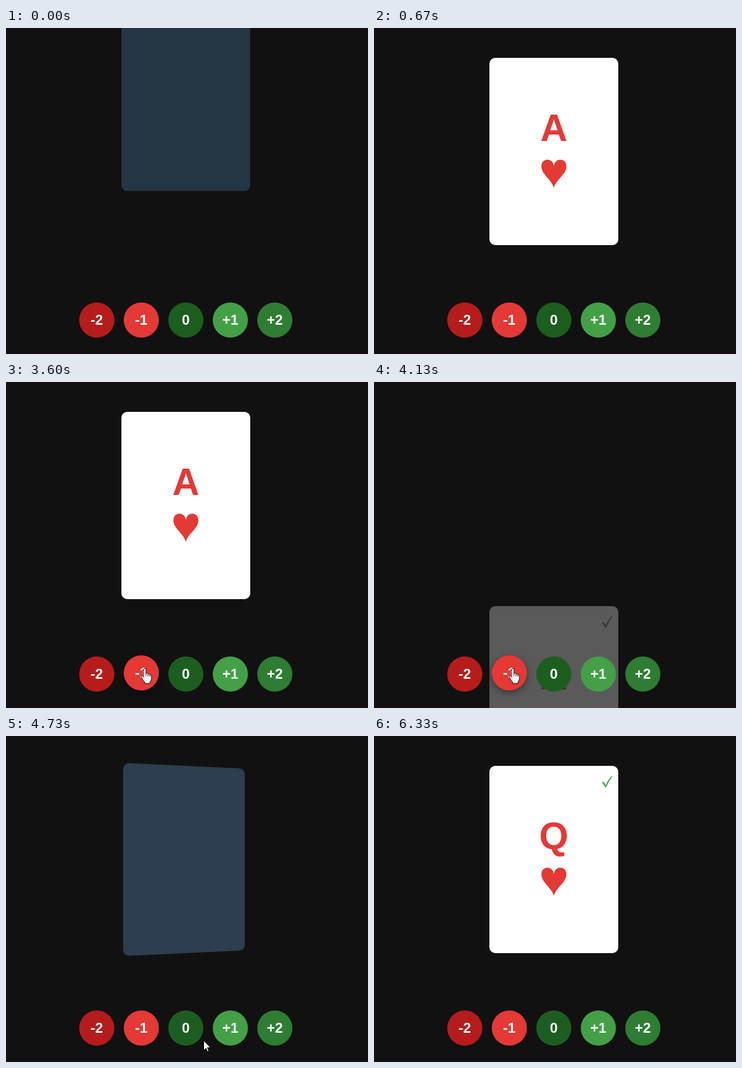
Recreate the animation shown at these times as an HTML page. Size 618 by 557 pixels, loop 8000 ms.

```html
<!DOCTYPE html>
<html lang="en">
<head>
<meta charset="utf-8">
<title>Card counting drill</title>
<style>
  html, body { margin: 0; width: 100%; height: 100%; overflow: hidden; background: #111; }
  body { position: relative; font-family: "Liberation Sans", Arial, sans-serif; font-weight: bold; }
  #slot { position: absolute; left: 197px; top: 51px; width: 220px; height: 320px; perspective: 1200px; }
  #card { width: 220px; height: 320px; border-radius: 10px; }
  #card svg { display: block; }
  .btn {
    position: absolute; top: 469px; width: 60px; height: 60px; border-radius: 50%;
    line-height: 60px; font-size: 24px; text-align: center; color: #fff;
  }
  #cursor { position: absolute; left: 0; top: 0; overflow: visible; }
</style>
</head>
<body>
<div id="slot"><div id="card">
  <svg id="face" width="220" height="320" fill="#e53935">
    <text id="rank" x="110" y="142" font-size="64" text-anchor="middle">A</text>
    <path d="M110 222C106 208 88.8 199 88.8 185.5C88.8 178 93.5 174 99 174C105 174 109 178 110 185C111 178 115 174 121 174C127 174 131.4 178 131.4 185.5C131.4 199 114 208 110 222Z"/>
    <path id="check" fill="#4caf50" d="M192 28.5L195 27Q197 30 198.3 33Q202.5 24 208 17.5L210 18Q203.5 26.5 199.5 36.5L197.5 36.8Q195.5 32 192 28.5Z"/>
  </svg>
</div></div>
<svg id="cursor" width="24" height="28" fill="#fff" stroke="#000" stroke-linejoin="round">
  <path id="arrow" d="M-.5 -.5V16L3.3 12.4L5.8 18.2L8.3 17.1L5.8 11.5H11Z"/>
  <g id="hand">
    <path d="M-2 0Q-2 -1.8 0 -1.8Q2 -1.8 2 0V6.5Q4.8 5.6 5.4 7.6Q8 7 8.6 8.9Q11.3 8.6 11.3 11.3V16Q11.3 18.6 9 21V24H-.5V21.8Q-2.6 19.8 -5.3 14.5Q-6.4 12.2 -5 11.5Q-3.4 10.9 -2 13.4Z"/>
    <path fill="none" d="M2 6.5V11.5M5.4 7.6V12M8.6 8.9V12.5"/>
  </g>
</svg>
<script>
const $ = id => document.getElementById(id);
const LOOP = 8000, DEAL = 400, FLIP = 500, HOVER = 200;
const DEALS = [-202, 4276], CHECKS = [3700, 5530];
const EXIT = 4030, EXIT_TIME = 246, DROP = 480;
const SHOW = 2400, HIDE = 6130;

// label, colour, hover intervals
const buttons = [
  ["-2", "#b71c1c", []],
  ["-1", "#e53935", [[3405, 4560], [5440, HIDE]]],
  ["0", "#1b5e20", [[2480, 2600], [3350, 3390], [5190, 5420]]],
  ["+1", "#43a047", [[2660, 3335], [4740, 5185]]],
  ["+2", "#2e7d32", []]
].map(([label, color, spans], i) => {
  const el = document.createElement("div");
  el.className = "btn";
  el.textContent = label;
  el.style.left = 125 + 76 * i + "px";
  el.style.background = color;
  document.body.insertBefore(el, $("cursor"));
  return { el, spans };
});

// time, x, y of the pointer's hot spot
const path = [
  [2400, 316, 549], [2560, 322, 520], [2930, 376, 505], [3270, 376, 505],
  [3450, 237, 491], [4500, 237, 491], [4640, 300, 536], [4820, 376, 505],
  [5080, 376, 505], [5200, 317, 491], [5560, 237, 491], [HIDE, 237, 491]
];

const clamp = v => Math.max(0, Math.min(1, v));

// cubic-bezier(.25, .1, .25, 1)
function ease(x) {
  x = clamp(x);
  let lo = 0, hi = 1;
  for (let i = 0; i < 22; i++) {
    const s = (lo + hi) / 2, r = 1 - s;
    if (.75 * s * r + s * s * s < x) lo = s; else hi = s;
  }
  const r = 1 - lo;
  return .3 * lo * r * r + 3 * lo * lo * r + lo * lo * lo;
}

function pointer(t) {
  let i = 0;
  while (i < path.length - 2 && t >= path[i + 1][0]) i++;
  const [a, x, y] = path[i], [b, u, v] = path[i + 1];
  let k = clamp((t - a) / (b - a));
  k *= k * (3 - 2 * k);
  return [x + (u - x) * k, y + (v - y) * k];
}

function drawCard(t) {
  const n = t < DEALS[1] ? 0 : 1, age = t - DEALS[n];
  const shown = ease(age / DEAL);
  const out = n ? 0 : ease((t - EXIT) / EXIT_TIME);
  const turn = 180 * ease((age - DEAL) / FLIP);
  const front = turn > 90;
  $("slot").style.transform = `translateY(${DROP * (shown - 1 + out)}px)`;
  $("slot").style.opacity = shown * (1 - out);
  $("card").style.transform = turn % 180 ? `rotateY(${front ? turn - 180 : turn}deg)` : "none";
  $("card").style.background = front ? "#fff" : "#2c3e50";
  $("face").style.visibility = front ? "visible" : "hidden";
  $("rank").textContent = "AQ"[n];
  $("check").style.opacity = ease((t - CHECKS[n]) / 220);
}

function drawPointer(t) {
  let over = false;
  for (const { el, spans } of buttons) {
    let h = 0;
    for (const [a, b] of spans) {
      h += ease((t - a) / HOVER) * (1 - ease((t - b) / HOVER));
      over = over || (t >= a && t < b);
    }
    h = clamp(h);
    el.style.transform = h ? `translateY(${-2 * h}px)` : "none";
    el.style.boxShadow = h ? `0 ${4 * h}px ${12 * h}px rgba(0,0,0,${.4 * h})` : "none";
  }
  const [x, y] = pointer(t);
  $("cursor").style.transform = `translate(${Math.round(x)}px, ${Math.round(y)}px)`;
  $("cursor").style.display = t >= SHOW && t < HIDE ? "block" : "none";
  $("hand").style.display = over ? "inline" : "none";
  $("arrow").style.display = over ? "none" : "inline";
}

let start;
function frame(now) {
  start ??= now;
  const t = (now - start) % LOOP;
  drawCard(t);
  drawPointer(t);
  requestAnimationFrame(frame);
}
requestAnimationFrame(frame);
</script>
</body>
</html>
```
